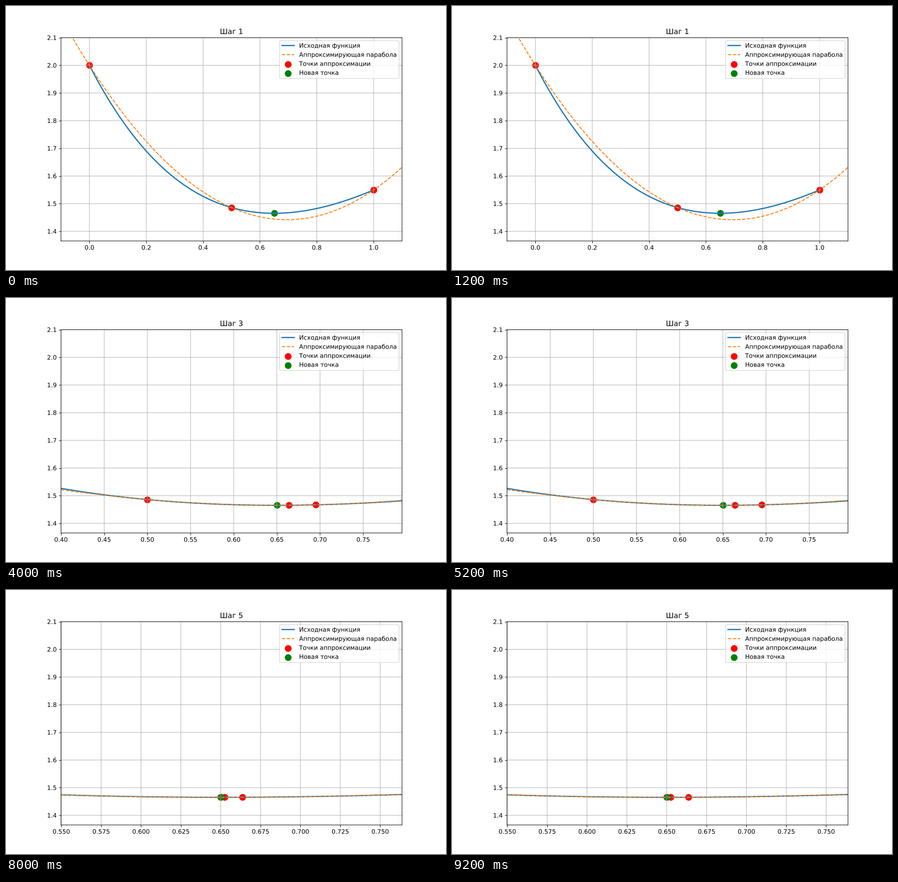
A matplotlib script that plays this animation: 966x580 px, repeating every 10000 ms.

```python
import numpy as np
import matplotlib.pyplot as plt
from matplotlib.animation import FuncAnimation
from matplotlib.patheffects import Normal

STEPS = 5
MARGIN = 0.1

# Sub-pixel placement: no snapping or hinting, text drawn as outlines.
plt.rcParams.update({
    "font.family": "DejaVu Sans",
    "path.snap": False,
    "path.effects": [Normal()],
    "text.hinting": "none",
})


def f(x):
    return np.sqrt(1 + x**2) + np.exp(-2 * x)


def fit(points):
    return np.polyfit(points, f(points), 2)


def search(points, steps):
    """Successive parabolic interpolation, dropping the worst point each time."""
    history = []
    for _ in range(steps):
        a, b, _ = fit(points)
        vertex = -b / (2 * a)
        history.append(points)
        kept = np.delete(points, np.argmax(f(points)))
        points = np.sort(np.append(kept, vertex))
    return history, vertex


history, best = search(np.array([0.0, 0.5, 1.0]), STEPS)
xs = np.linspace(0, 1, 200)
ys = f(xs)

fig, ax = plt.subplots(figsize=(10, 6.00415), dpi=96.6)


def draw(step):
    points = history[step]
    left, right = points.min() - MARGIN, points.max() + MARGIN
    px = np.linspace(left, right, 200)

    ax.clear()
    ax.plot(xs, ys, lw=2, label="Исходная функция")
    ax.plot(px, np.polyval(fit(points), px), "--", label="Аппроксимирующая парабола")
    ax.scatter(points, f(points), s=100, color="red", label="Точки аппроксимации")
    ax.scatter(best, f(best), s=100, color="green", label="Новая точка")
    ax.set_xlim(left, right)
    ax.set_ylim(ys.min() - MARGIN, ys.max() + MARGIN)
    ax.set_title(f"Шаг {step + 1}")
    ax.legend(loc="upper right", labelspacing=0.54)
    ax.grid(True)


anim = FuncAnimation(fig, draw, frames=STEPS, interval=2000, repeat=True)
plt.show()
```
